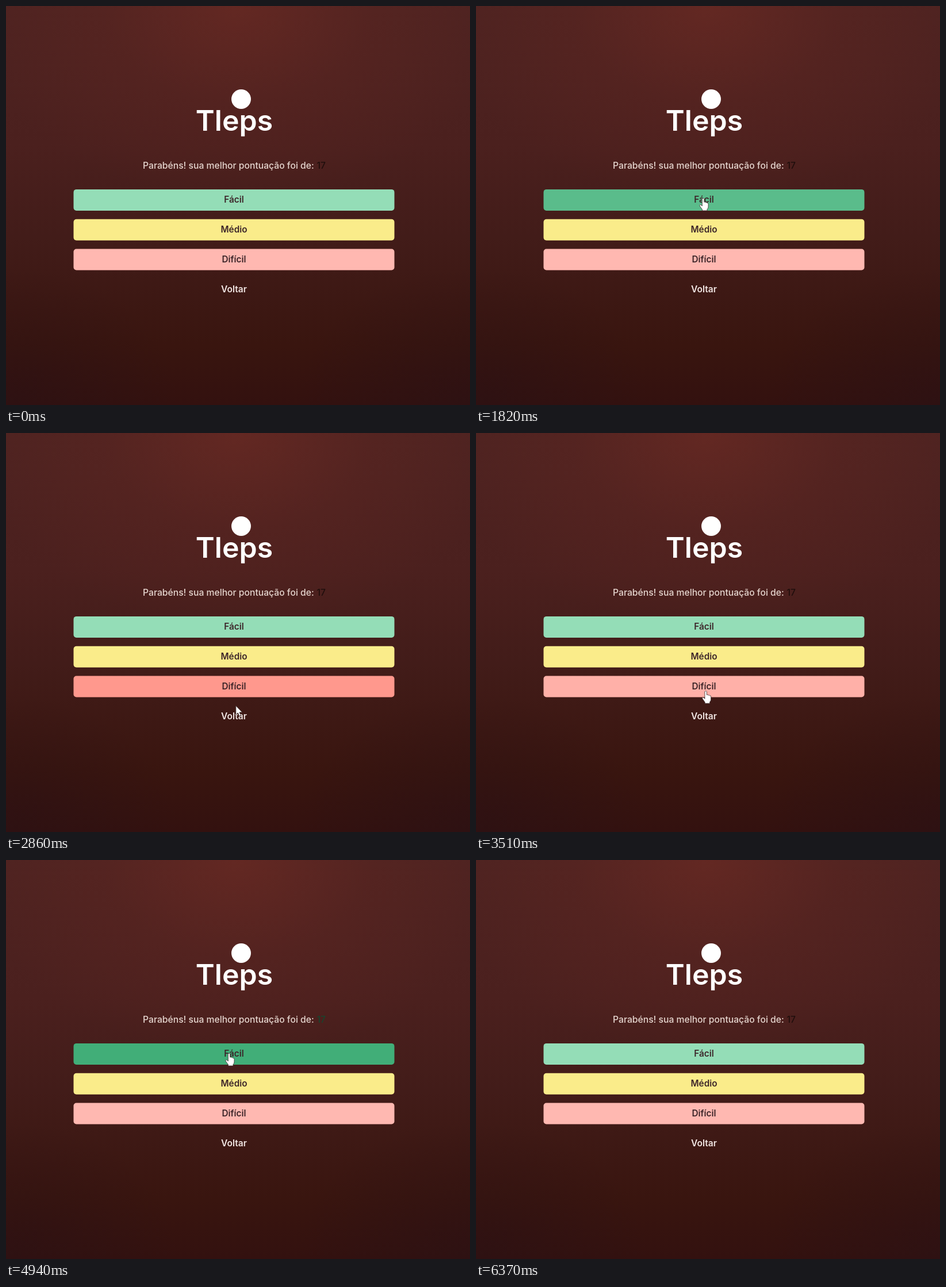
These frames come from a looping animation (807 by 694 pixels, 6500 ms). An HTML page:

```html
<!DOCTYPE html>
<html lang="pt">
<head>
<meta charset="utf-8">
<title>Menu</title>
<style>
  html, body { margin: 0; width: 100%; height: 100%; overflow: hidden; }
  body {
    background:
      radial-gradient(ellipse 460px 340px at 50% 0, rgba(108, 42, 35, .7), rgba(96, 38, 33, .36) 50%, rgba(80, 34, 30, 0)),
      radial-gradient(ellipse 300px 240px at 0 100%, rgba(42, 17, 21, .55), rgba(42, 17, 21, 0)),
      radial-gradient(ellipse 300px 240px at 100% 100%, rgba(42, 17, 21, .55), rgba(42, 17, 21, 0)),
      linear-gradient(#4e2321, #4b201e 35%, #421c19 58%, #39150f 85%, #33110f);
  }
  svg { display: block; width: 807px; height: 694px; }
  text { font: 600 15.3px Inter, "Open Sans", sans-serif; text-anchor: middle; fill: #3b2428; }
  .name { font-size: 50px; fill: #fff; }
  .best { font-size: 15.7px; font-weight: 500; text-anchor: start; fill: #e6d6cf; }
  .back { font-size: 15.6px; fill: #f1e6e3; }
  .cursor path { fill: #fff; stroke: #3c2c2c; stroke-width: .8; stroke-linejoin: round; }
</style>
</head>
<body>
<svg viewBox="0 0 807 694">
  <circle cx="409" cy="162" r="17" fill="#fff"/>
  <text class="name" x="397" y="217">Tleps</text>
  <text class="best" x="238" y="283">Parabéns! sua melhor pontuação foi de:</text>
  <text class="best" id="score" x="540.5" y="283">17</text>
  <g id="buttons"></g>
  <text class="back" x="396.5" y="498">Voltar</text>
  <g class="cursor" id="cursor">
    <path id="hand" d="M-1.7 1.5Q0-1 1.7 1.5V7.2Q3.2 6 4.5 7.8Q6 7 7 8.6Q8.8 8 9 10.2V15Q9 18 7 19.5V22H-1.5V20L-5.6 14.2Q-6.8 12 -5 11.6Q-3.4 11.5 -1.7 14Z"/>
    <path id="arrow" d="M0 0V15.5L3.5 12.2L6 18L8.6 16.9L6.2 11.3H11Z"/>
  </g>
</svg>
<script>
const LOOP = 6500, STEP = 130, FADE = 300, SAMPLES = 30;
const PITCH = 51.8, HEIGHT = 37;
const $ = id => document.getElementById(id);

const buttons = [
  { label: 'Fácil', idle: '#94ddb7', hover: '#41ae78' },
  { label: 'Médio', idle: '#faec8a', hover: '#f8db5f' },
  { label: 'Difícil', idle: '#ffb8b1', hover: '#ff8578' }
];
buttons.forEach((b, i) => {
  b.top = 318.9 + PITCH * i;
  b.rect = add('rect', { x: 117.5, y: b.top, width: 558, height: HEIGHT, rx: 5 });
  add('text', { x: 396.5, y: Math.round(b.top + 23) }).textContent = b.label;
});

// The pointer comes in from below, visits a few spots and leaves again.
const entry = { x: 402, y: 610 };
const moves = [
  { from: 390, to: 1100, x: 399, y: 450 },
  { from: 1170, to: 1820, x: 395, y: 334 },
  { from: 2080, to: 3250, x: 401, y: 508 },
  { from: 3250, to: 4030, x: 398, y: 377 },
  { from: 4030, to: 4420, x: 388, y: 336 },
  { from: 5200, to: 6110, x: 372, y: 700 }
];

function add(tag, attrs) {
  const el = document.createElementNS($('buttons').namespaceURI, tag);
  for (const key in attrs) el.setAttribute(key, attrs[key]);
  return $('buttons').appendChild(el);
}

const easeOut = k => 1 - (1 - k) ** 1.5;

function tip(t) {
  const pos = { ...entry };
  for (const m of moves) {
    if (t < m.from) break;
    const k = easeOut(Math.min(1, (t - m.from) / (m.to - m.from)));
    pos.x += (m.x - pos.x) * k;
    pos.y += (m.y - pos.y) * k;
  }
  return pos;
}

const inside = (b, p) => p.y >= b.top && p.y <= b.top + HEIGHT;

// Share of the last FADE ms spent over the button: a linear fade in and out.
function hoverLevel(b, t) {
  let hits = 0;
  for (let i = 0; i < SAMPLES; i++) hits += inside(b, tip(t - FADE * (i + .5) / SAMPLES));
  return hits / SAMPLES;
}

function draw(t) {
  const p = tip(t), over = buttons.some(b => inside(b, p));
  for (const b of buttons) {
    b.rect.style.fill = `color-mix(in srgb, ${b.hover} ${hoverLevel(b, t) * 100}%, ${b.idle})`;
  }
  $('score').style.fill = hoverLevel(buttons[0], t) === 1 && t > LOOP / 2 ? '#17452e' : '#1f0e0c';
  $('cursor').style.display = t < moves[0].from ? 'none' : '';
  $('cursor').setAttribute('transform', `translate(${p.x} ${p.y})`);
  $('hand').style.display = over ? '' : 'none';
  $('arrow').style.display = over ? 'none' : '';
}

const start = performance.now();
function tick() {
  const t = (performance.now() - start) % LOOP;
  draw(Math.floor(t / STEP) * STEP);
  requestAnimationFrame(tick);
}
tick();
</script>
</body>
</html>
```
